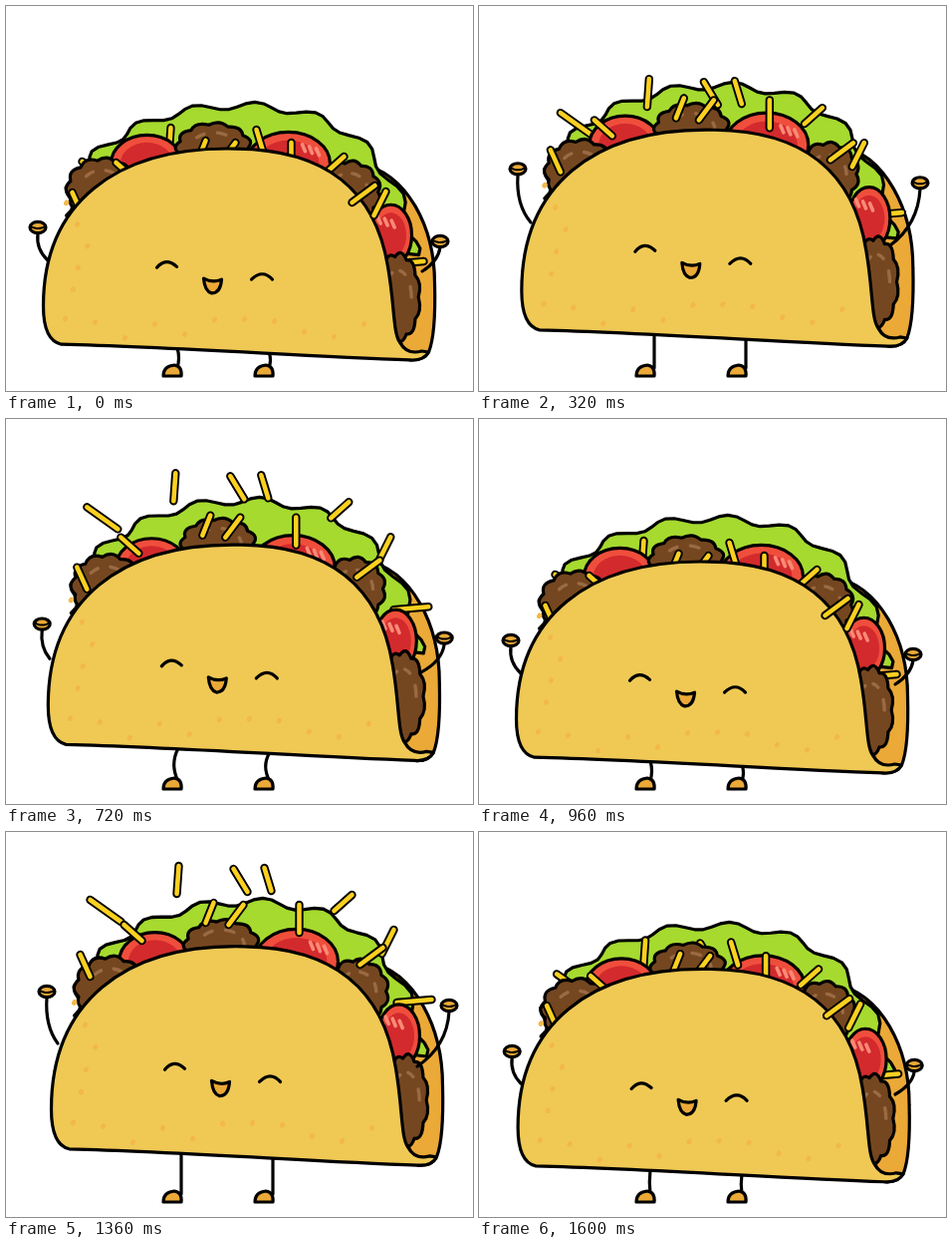
Recreate the animation shown at these times as an HTML page with a canvas. Size 469 by 386 pixels, loop 1680 ms.

```html
<!DOCTYPE html>
<html lang="en">
<head>
<meta charset="utf-8">
<title>Dancing taco</title>
<style>
html, body { margin: 0; width: 100%; height: 100%; overflow: hidden; background: #fff; }
canvas { display: block; }
</style>
</head>
<body>
<canvas id="stage" width="469" height="386"></canvas>
<script>
const ctx = document.getElementById('stage').getContext('2d');
const STEP = 80, LOOP = 1680, BOUNCE = 840;
const ORANGE = '#eba937', GROUND = 335;

const FRONT = new Path2D(`M62 324Q44 320 44 285C44 182 115 122 238 125C330 126 378 170 390 245
  C397 285 395 312 402 322Q409 335 424 331L431 332Q426 341 412 340C300 336 180 327 62 324Z`);
const BACK = new Path2D('M362 140C410 150 437 205 437 262C438 300 435 322 431 332Q426 341 412 340L370 260Z');
const EYES = new Path2D('M158 246Q167 235 178 245M253 258Q264 247 274 258');
const MOUTH = new Path2D('M205 257Q214 262 223 258Q222 272 213 272Q206 270 205 257Z');

// Cheese sticks at the height they have while falling back
const TOSSED = new Path2D('M83 87l31 22M172 53l-2 28M227 56l14 23M391 190l35 -3');
const TOSSED_FRONT = new Path2D('M258 55l7 23M346 82l-18 16');
const HOPPING = new Path2D('M207 97l-8 20M237 99l-15 20M293 99v28M117 119l18 16M73 149l10 22');
const TOSSED_EDGE = new Path2D('M388 117l-12 24');
const HOPPING_EDGE = new Path2D('M377 142l-23 17');

const LETTUCE = lettuceArch();
const SPOTS = shellSpots();

const ramp = (t, from, to) => Math.min(1, Math.max(0, (t - from) / (to - from)));
const pulse = (t, rise, top, fall, end) => ramp(t, rise, top) * (1 - ramp(t, fall, end));

function lettuceArch() {
  const path = new Path2D();
  for (let a = 0; a <= Math.PI; a += .05) {
    const ripple = 1 - .035 * Math.sin(18 * a), side = -Math.cos(a);
    const droop = 45 * Math.max(0, side) ** 5;
    path.lineTo(242 + 175 * side * ripple, 193 - 112 * Math.sin(a) * ripple + droop);
  }
  path.closePath();
  return path;
}

// Spots gather along the bottom and the left edge of the shell
function shellSpots() {
  const path = new Path2D();
  const random = n => Math.abs(Math.sin(n * 78.233) * 43758.5453) % 1;
  for (let i = 0; i < 16; i++) {
    const low = i < 11;
    const x = low ? 66 + 30 * i : 58 + 42 * random(i);
    const y = low ? 298 + 20 * random(i) : 180 + 22 * (i - 11);
    path.moveTo(x, y);
    path.ellipse(x, y, 2.5, 3, .5, 0, 7);
  }
  return path;
}

function fill(path, color) {
  ctx.fillStyle = color;
  ctx.fill(path);
}

function ink(path, color = '#000', width = 3.2) {
  ctx.strokeStyle = color;
  ctx.lineWidth = width;
  ctx.stroke(path);
}

function paint(path, color) {
  fill(path, color);
  ink(path);
}

function oval(x, y, rx, ry, from = 0, to = 7) {
  const path = new Path2D();
  path.ellipse(x, y, rx, ry, 0, from, to);
  return path;
}

function meat(x, y, rx, ry) {
  const lumps = 11, path = new Path2D();
  const at = (i, size) => {
    const a = i / lumps * 2 * Math.PI;
    return [x + rx * size * Math.cos(a), y + ry * size * Math.sin(a)];
  };
  path.moveTo(...at(0, .94));
  for (let i = 0; i < lumps; i++) path.quadraticCurveTo(...at(i + .5, 1.17), ...at(i + 1, .94));
  paint(path, '#754720');
  for (const a of [-2.4, -1.4, -.4]) ink(oval(x, y, rx * .62, ry * .62, a, a + .4), '#9a6a43', 3.4);
}

// seedSide places the seeds left or right of the middle
function tomato(x, y, rx, ry, seedSide) {
  paint(oval(x, y, rx, ry), '#f04e3c');
  fill(oval(x, y, rx * .74, ry * .74), '#d32a2d');
  if (!seedSide) return;
  for (let i = -1; i <= 1; i++) {
    const seedX = x + seedSide * rx + 7 * i, seedY = y - ry * .45 + 2 * i;
    ink(new Path2D(`M${seedX} ${seedY - 3}l3 7`), '#f98a76', 3.6);
  }
}

function cheese(sticks, dx, dy) {
  ctx.save();
  ctx.translate(dx, dy);
  ink(sticks, '#000', 8.4);
  ink(sticks, '#fbd020', 4.6);
  ctx.restore();
}

function arm(x, y, shoulderX, shoulderY) {
  ink(new Path2D(`M${shoulderX} ${shoulderY}Q${x - 2} ${(y + 2 * shoulderY) / 3} ${x} ${y + 6}`));
  paint(oval(x, y, 8, 5.6), ORANGE);
  ink(oval(x, y - 3, 8, 4, .3, 2.8), '#000', 2);
}

function leg(x, hipY, footX, knee) {
  ink(new Path2D(`M${x} ${hipY}Q${x + knee} ${(hipY + 362) / 2} ${x} 363`));
  paint(new Path2D(`M${footX} 371Q${footX} 361 ${footX + 11} 360Q${footX + 19} 361 ${footX + 18} 371Z`), ORANGE);
}

function draw(t) {
  const lift = pulse(t, 120, 420, 680, 780);
  const toss = pulse(t, 120, 480, 705, 770);
  const raise = pulse(t, 120, 300, 620, 745);
  const lowered = 1 - raise, slack = lift * lowered;

  const dx = 8 * lift - 6.5, dy = 15 - 21 * lift;
  const tossY = 69 - 88 * toss, hopY = 38 - 64 * lift;
  const fistX = 32 + 6 * lift + 3 * raise, fistY = 222 - 52 * raise - 10 * lift;
  const shoulderY = 255 - 15 * lift - 28 * raise;
  const knee = 3 * lowered - 22 * slack;

  const inBody = (paintParts, drop = 0) => {
    ctx.save();
    ctx.translate(dx, GROUND + dy + drop);
    ctx.scale(1, .985 + .035 * lift);
    ctx.translate(0, -GROUND);
    paintParts();
    ctx.restore();
  };

  ctx.fillStyle = '#fff';
  ctx.fillRect(0, 0, 469, 386);
  ctx.lineCap = ctx.lineJoin = 'round';

  leg(176 - 4 * lowered, 328 + dy, 158, knee);
  leg(268 - 4 * lowered, 332 + dy, 250, knee);
  arm(fistX, fistY, 42 + 10 * raise, shoulderY);

  inBody(() => {
    paint(BACK, ORANGE);
    paint(LETTUCE, '#a6da2f');
  });
  cheese(TOSSED, dx, tossY);
  inBody(() => {
    tomato(148, 140, 36, 29);
    tomato(290, 140, 42, 32, .5);
    tomato(393, 213, 21, 31, -.3);
  }, 16 * slack);
  inBody(() => {
    meat(103, 166, 35, 31);
    meat(215, 124, 37, 25);
    meat(351, 169, 31, 31);
    meat(400, 276, 22, 44);
  });
  cheese(HOPPING, dx, hopY);
  cheese(TOSSED_FRONT, dx, tossY);
  inBody(() => {
    paint(FRONT, '#f0c955');
    fill(SPOTS, '#f2b948');
    ink(EYES);
    paint(MOUTH, ORANGE);
  });
  cheese(TOSSED_EDGE, dx, tossY);
  cheese(HOPPING_EDGE, dx, hopY);
  arm(fistX + 404, fistY + 14, 418 - 5 * raise, shoulderY + 11 + 12 * raise);
}

function tick() {
  const time = Math.floor(performance.now() % LOOP / STEP) * STEP;
  draw(time % BOUNCE);
  requestAnimationFrame(tick);
}
tick();
</script>
</body>
</html>
```
